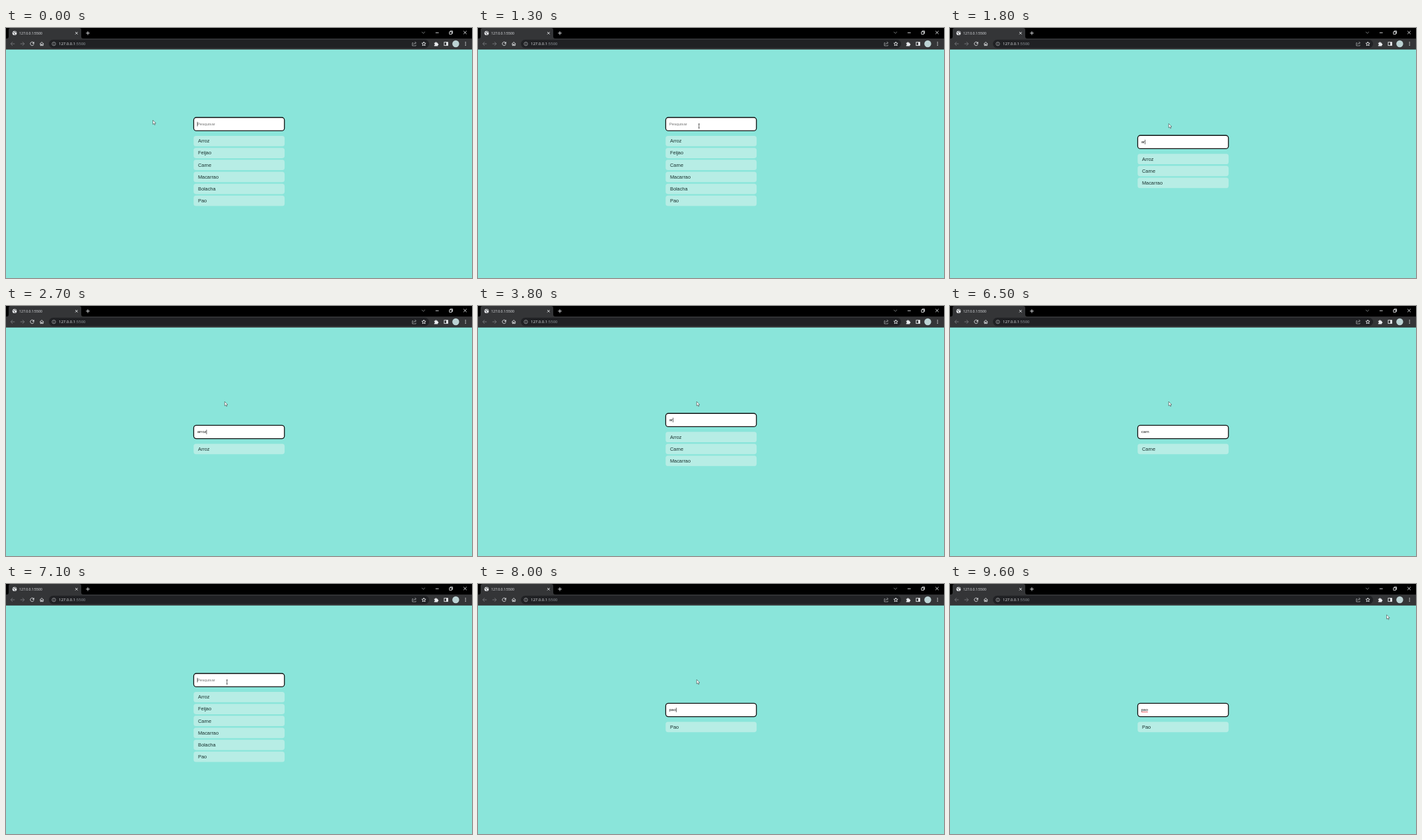
An HTML page for the animation above (9.7 s loop, 706 by 380 pixels).

```html
<!DOCTYPE html>
<html lang="pt">
<head>
<meta charset="utf-8">
<title>127.0.0.1:5500</title>
<style>
html, body { margin: 0; width: 100%; height: 100%; overflow: hidden; background: #8ae5da; }
svg { display: block; width: 706px; height: 380px; }
.ui { font-family: "Open Sans", "Noto Sans", sans-serif; fill: #e8eaed; }
.page { font-family: "Liberation Sans", Arial, sans-serif; }
.line { fill: none; stroke: #e8eaed; stroke-width: .9; }
.dim { stroke: #77797c; }
.soft { stroke: #b4b6b9; stroke-width: .7; }
.item rect { fill: #b7ede5; }
.item text { font-size: 7.353px; fill: #17302d; }
#field text { font-size: 6.128px; }
</style>
</head>
<body>
<svg viewBox="0 0 706 380">
  <rect width="706" height="380" fill="#8ae5da"/>

  <!-- tab strip -->
  <rect width="706" height="17" fill="#000"/>
  <path d="M1 16Q4 16 4 13V3Q4 0 7 0H111Q114 0 114 3V13Q114 16 117 16Z" fill="#343537"/>
  <circle cx="13" cy="7.7" r="3.3" fill="#e8eaed"/>
  <path d="M10.4 6.2l2 1.2.2 1.5 1.2.7-.7 1M13 4.8l.6 1.3 2 .4" fill="none" stroke="#343537" stroke-width=".9"/>
  <text class="ui" x="20" y="9.6" font-size="5.15">127.0.0.1:5500</text>
  <path class="line" d="M105 6l3.6 3.6M108.6 6l-3.6 3.6M121.2 7.8h5.6M124 5v5.6"/>
  <path class="line soft" d="M630 5.8l2.4 2.4 2.4-2.4"/>
  <path class="line" d="M650.8 7.2h4.8M693.2 4.6l4.6 4.6M697.8 4.6l-4.6 4.6"/>
  <path class="line" stroke-width=".7" d="M671.8 5.8h3.6v3.6h-3.6zM673 5.6V4.6h3.6v3.6h-1"/>

  <!-- toolbar -->
  <rect y="16" width="706" height="16.7" fill="#343537"/>
  <rect x="65" y="17.8" width="576" height="12.6" rx="6.3" fill="#202124"/>
  <path class="line dim" d="M13.2 24H7.4M10 21.2L7.2 24l2.8 2.8M21.8 24h5.8M25 21.2l2.8 2.8-2.8 2.8"/>
  <path class="line" d="M41.8 22.4a2.7 2.7 0 1 0 .4 2.1"/>
  <path d="M42.6 20.8v2.9h-2.9z" fill="#e8eaed"/>
  <path class="line" d="M51.2 24.3l3-2.8 3 2.8M52.2 23.8v2.9h1.4v-1.9h1.2v1.9h1.4v-2.9"/>
  <circle class="line soft" cx="72.5" cy="24.1" r="2.7"/>
  <path class="line soft" d="M72.5 23.7v1.8M72.5 22.4v.7"/>
  <text class="ui" x="80" y="26.3" font-size="5.97">127.0.0.1<tspan fill="#9aa0a6">:5500</tspan></text>
  <path class="line soft" d="M617 22.6h-1.4v4.4h5.4v-1.4M617.2 25.4q.3-2.6 3.6-2.8M619.6 20.9l1.8 1.7-1.8 1.7"/>
  <path class="line" stroke-width=".7" d="M633 21l.9 2 2.2.2-1.7 1.5.6 2.2-2-1.2-2 1.2.6-2.2-1.7-1.5 2.2-.2z"/>
  <path d="M648.8 22.4h1.5a1.1 1.1 0 0 1 2.2 0h1.7v1.6a1.1 1.1 0 0 1 0 2.2v1.4h-5.4v-1.5a1 1 0 0 0 0-2z" fill="#e8eaed"/>
  <rect class="line" x="663.9" y="21.6" width="5.4" height="5"/>
  <rect x="667" y="21.6" width="2.4" height="5" fill="#e8eaed"/>
  <circle cx="681.4" cy="24" r="5.2" fill="#bcd3d4"/>
  <g fill="#e8eaed"><circle cx="696.2" cy="21.7" r=".7"/><circle cx="696.2" cy="24" r=".7"/><circle cx="696.2" cy="26.3" r=".7"/></g>

  <!-- search box and list, moved as one block -->
  <g id="block" class="page">
    <g id="field">
      <rect x="284.4" y="136" width="137.4" height="20.2" rx="4" fill="#fff" stroke="#101010" stroke-width="1.3"/>
      <text id="hint" x="289.7" y="148.1" fill="#757575">Pesquisar</text>
      <text id="typed" x="289.7" y="148.1" fill="#111"></text>
      <path id="squiggle" d="M289.8 149.2h10" stroke="#e0363c" stroke-width=".8"/>
      <rect id="caret" y="142.6" width=".6" height="6.9" fill="#000"/>
    </g>
    <g id="list"></g>
  </g>

  <g id="mouse">
    <path id="arrow" d="M0 0V6.4L1.5 5.1L2.5 7.4L3.6 6.9L2.6 4.7H4.6Z" fill="#fff" stroke="#222" stroke-width=".5"/>
    <path id="beam" d="M2.3 .6h2.4M3.5 .6v6.2M2.3 6.8h2.4" fill="none" stroke="#222" stroke-width=".7"/>
  </g>
</svg>
<script>
const LOOP = 9700, STEP = 100, PITCH = 18.16;
const foods = ['Arroz', 'Feijao', 'Carne', 'Macarrao', 'Bolacha', 'Pao'];

const keys = [
  [0, ''], [1500, 'a'], [1800, 'ar'], [2000, 'arr'], [2200, 'arro'], [2700, 'arroz'],
  [3500, 'arro'], [3700, 'arr'], [3800, 'ar'], [4000, 'a'], [4200, ''],
  [4800, 'c'], [5000, 'ca'], [5200, 'car'], [5400, 'carn'], [5600, 'carne'],
  [6500, 'carn'], [6600, 'car'], [6800, 'ca'], [6900, 'c'], [7100, ''],
  [7700, 'p'], [7800, 'pa'], [8000, 'pao']
];
const caretOff = [[300, 800], [1300, 1500], [3200, 3500], [6100, 6600], [8600, 9100], [9600, LOOP]];
const path = [
  [0, 222.5, 140], [200, 176, 126], [300, 152.3, 120.4],
  [500, 165, 122], [600, 206, 130], [700, 262, 140], [800, 308, 147], [900, 325, 148.4],
  [1300, 331.3, 145.3]
];
const leave = { from: 8500, to: 9500, x: 661.5, y: 46.8 };

const $ = id => document.getElementById(id);
const show = (el, on) => el.setAttribute('visibility', on ? 'visible' : 'hidden');
const move = (el, x, y) => el.setAttribute('transform', `translate(${x} ${y})`);
const latest = (rows, t) => rows.filter(r => r[0] <= t).pop();

function addItem(name) {
  const g = document.createElementNS('http://www.w3.org/2000/svg', 'g');
  g.setAttribute('class', 'item');
  g.innerHTML = `<rect x="284.3" y="164" width="137.8" height="15.8" rx="3.6"/>
    <text x="291" y="174.3">${name}</text>`;
  $('list').append(g);
  return { g, key: name.toLowerCase() };
}
const items = foods.map(addItem);

function mouseAt(t) {
  const [, x, y] = latest(path, t);
  const p = Math.min(1, Math.max(0, (t - leave.from) / (leave.to - leave.from)));
  const e = p * p * (3 - 2 * p);
  return [x + (leave.x - x) * e, y + (leave.y - y) * e];
}

function draw(t) {
  const text = latest(keys, t)[1];
  let count = 0;
  for (const { g, key } of items) {
    const hit = key.includes(text);
    g.style.display = hit ? '' : 'none';
    if (hit) move(g, 0, PITCH * count++);
  }
  const shift = (items.length - count) * PITCH / 2;
  move($('block'), 0, shift);

  $('typed').textContent = text;
  show($('hint'), !text);
  show($('squiggle'), t >= 8600);
  show($('caret'), !caretOff.some(([a, b]) => t >= a && t < b));
  $('caret').setAttribute('x', 289.7 + (text ? $('typed').getComputedTextLength() : 0));

  const [x, y] = mouseAt(t);
  const inside = x > 280.5 && x < 418 && y + 3.7 > 136 + shift && y + 3.7 < 156 + shift;
  move($('mouse'), x, y);
  show($('arrow'), !inside);
  show($('beam'), inside);
}

const start = performance.now();
function tick() {
  const t = (performance.now() - start) % LOOP;
  draw(Math.floor(t / STEP) * STEP);
  requestAnimationFrame(tick);
}
tick();
</script>
</body>
</html>
```
